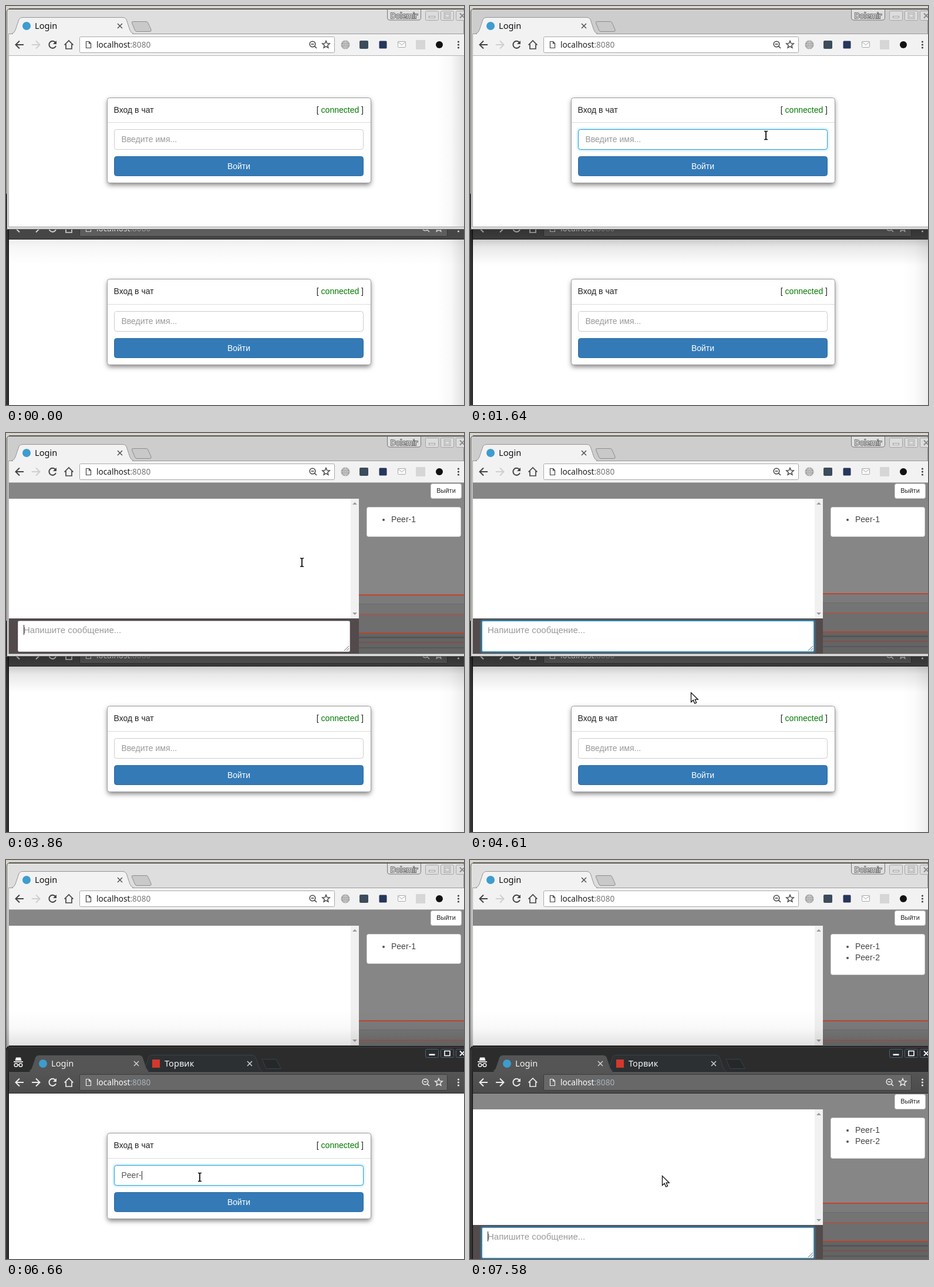
Write an HTML page that moves like this. It is 780 px wide and 680 px high and loops after 8 s.

```html
<!DOCTYPE html>
<html lang="ru">
<head>
<meta charset="utf-8">
<title>Chat login</title>
<style>
html, body { margin: 0; width: 100%; height: 100%; overflow: hidden; background: #d9d3c9; }
svg { display: block; }
text { white-space: pre; }
.ui { font-family: "Noto Sans", sans-serif; }
.pg { font: 14px "Liberation Sans", Arial, sans-serif; fill: #222; }
</style>
</head>
<body>
<svg id="stage" width="780" height="680" viewBox="0 0 780 680" xmlns="http://www.w3.org/2000/svg"></svg>
<script>
const LOOP = 8000;
const NAMES = ['Peer-1', 'Peer-2'];
const OWNER = 'Dolemir', OTHER_TAB = 'Торвик';
const stage = document.getElementById('stage');

const rect = (x, y, w, h, fill, extra = '') =>
  `<rect x="${x}" y="${y}" width="${w}" height="${h}" fill="${fill}" ${extra}/>`;
// one-pixel outline aligned to the pixel grid
const box = (x, y, w, h, fill, line, r = 0, extra = '') =>
  rect(x + .5, y + .5, w - 1, h - 1, fill, `stroke="${line}" rx="${r}" ${extra}`);
const path = (d, fill, line = 'none', w = 1, extra = '') =>
  `<path d="${d}" fill="${fill}" stroke="${line}" stroke-width="${w}" ${extra}/>`;
const text = (x, y, s, cls, extra = '') =>
  `<text x="${x}" y="${y}" class="${cls}" ${extra}>${s}</text>`;
const dot = (x, y, r, fill, extra = '') =>
  `<circle cx="${x}" cy="${y}" r="${r}" fill="${fill}" ${extra}/>`;
const fade = (id, dir, a, mid, b) =>
  `<linearGradient id="${id}" x1="0" y1="0" ${dir}><stop stop-opacity="${a}"/>` +
  `<stop offset=".5" stop-opacity="${mid}"/><stop offset="1" stop-opacity="${b}"/></linearGradient>`;

const DEFS = `<defs>
${fade('down', 'x2="0" y2="1"', .36, .09, 0)}
${fade('up', 'x2="0" y2="1"', 0, .025, .12)}
${fade('side', 'x2="1" y2="0"', 0, .025, .12)}
<linearGradient id="darkBar" x1="0" y1="0" x2="0" y2="1"><stop stop-color="#555"/><stop offset="1" stop-color="#4b4b4b"/></linearGradient>
<filter id="drop" x="-10%" y="-20%" width="120%" height="150%"><feGaussianBlur stdDeviation="4"/></filter>
<filter id="glow" x="-10%" y="-60%" width="120%" height="220%"><feGaussianBlur stdDeviation="1.8"/></filter>
<clipPath id="topClip"><rect y="4" width="780" height="377"/></clipPath>
</defs>`;

function toolbar(dy, dark) {
  const ink = dark ? '#ececec' : '#444', right = dark ? 752 : 560;
  const stroke = (d, c = ink, w = 2) => path(d, 'none', c, w);
  const zoom = right - 38, star = right - 15;
  let pts = '';
  for (let i = 0; i < 10; i++) {
    const a = i * Math.PI / 5, r = i % 2 ? 2.9 : 6.6;
    pts += `${i ? 'L' : 'M'}${star + r * Math.sin(a)} ${66 - r * Math.cos(a)}`;
  }
  return `<g transform="translate(0 ${dy})">` +
    box(125, 52, right - 125, 28, dark ? '#686868' : '#fff', dark ? '#3c3c3c' : '#a9a9a9', 2) +
    stroke('M30 66H17M23 59.5L16.5 66L23 72.5') +
    stroke('M44 66H57M51 59.5L57.5 66L51 72.5', dark ? ink : '#cfcfcf') +
    stroke('M84 62A6 6 0 1 0 85 68') + path('M86 59V65H80Z', ink) +
    stroke('M99.5 66.5L107 59L114.5 66.5M102 65V73H112V65', ink, 1.7) +
    stroke('M136.5 60.5H141.5L144.5 63.5V71.5H136.5ZM141.5 60.5V64H144.5', ink, 1.2) +
    text(154, 71, `localhost<tspan fill="${dark ? '#a9b4bb' : '#777'}">:8080</tspan>`, 'ui',
      `font-size="13.6" fill="${dark ? '#fff' : '#1c1c1c'}"`) +
    dot(zoom, 65, 4.8, 'none', `stroke="${ink}" stroke-width="1.5"`) +
    stroke(`M${zoom + 3.5} 68.5L${zoom + 7} 72M${zoom - 2.5} 65H${zoom + 2.5}`, ink, 1.6) +
    path(pts + 'Z', 'none', ink, 1.4) +
    [61, 66, 71].map(y => dot(770.5, y, 1.6, ink)).join('') + '</g>';
}

function winButtons(y, dark) {
  const line = dark ? '#536070' : '#a6a6a6', ink = dark ? '#fff' : '#f8f8f8';
  const edge = dark ? 'none' : '#888', h = dark ? 15 : 17, c = y + h / 2;
  const square = `M747 ${c - 4}H756V${c + 4}H747Z`;
  return [714, 740, 766].map(x => box(x, y, 23, h, dark ? '#292c30' : '#dcdcdc', line, 2)).join('') +
    rect(720.5, c + 1, 10, 2.5, ink, `stroke="${edge}" stroke-width=".8"`) +
    path(square, 'none', dark ? ink : '#8c8c8c', dark ? 1.6 : 2.4) +
    (dark ? '' : path(square, 'none', ink)) +
    path(`M773 ${c - 4}L781 ${c + 4}M781 ${c - 4}L773 ${c + 4}`, 'none', dark ? ink : '#888', 1.8);
}

const cross = (x, y, c) => path(`M${x - 4} ${y - 4}L${x + 4} ${y + 4}M${x + 4} ${y - 4}L${x - 4} ${y + 4}`, 'none', c, 1.6);
const tab = (x, y, w, fill, line) =>
  path(`M${x} ${y + 28}Q${x + 4} ${y + 27} ${x + 6} ${y + 22}L${x + 12} ${y + 4}Q${x + 14} ${y + .5} ${x + 18} ${y + .5}` +
    `H${x + w - 18}Q${x + w - 14} ${y + .5} ${x + w - 12} ${y + 4}L${x + w - 6} ${y + 22}Q${x + w - 4} ${y + 27} ${x + w} ${y + 28}`, fill, line);
const tabText = (x, y, s, c) => text(x, y, s, 'ui', `font-size="14.6" fill="${c}"`);

// a: shift of the panel head, b: shift of the controls
function loginView(id, a, b) {
  const h = 145 + b - a;
  return `<g id="${id}Login">` +
    rect(173, 160 + a, 448, h, '#000', 'rx="4" opacity=".5" filter="url(#drop)"') +
    box(172, 156 + a, 450, h + 1, '#fff', '#9c9c9c', 4) +
    rect(173, 198 + b, 448, 1, '#ddd') +
    text(183.5, 182 + a, 'Вход в чат', 'pg') +
    text(609, 182 + a, '[ <tspan fill="#007a00">connected</tspan> ]', 'pg', 'text-anchor="end"') +
    rect(184, 210 + b, 425, 35, 'none', `id="${id}Glow" rx="4" stroke="#7fd8f2" stroke-width="3" filter="url(#glow)"`) +
    box(184, 210 + b, 425, 35, '#fff', '#ccc', 4, `id="${id}Input"`) +
    text(196.5, 232 + b, 'Введите имя...', 'pg', `id="${id}Hint" style="fill:#999"`) +
    text(196.5, 232 + b, '', 'pg', `id="${id}Name" style="fill:#555"`) +
    rect(197, 220 + b, 1, 15, '#222', `id="${id}Caret"`) +
    box(184, 256 + b, 425, 34, '#337ab7', '#2e6da4', 4) +
    text(396.5, 278 + b, 'Войти', 'pg', 'text-anchor="middle" style="fill:#fff"') + '</g>';
}

const bands = (y, end) =>
  [[0, '#7b7b7b'], [16, '#747474'], [34, '#6e6e6e'], [66, '#646464']]
    .map(([d, c]) => rect(601, y + d, 179, end - y - d, c)).join('') +
  [[0, '#c4432c', 2], [16, '#6b6b6b', 1], [33, '#a0584c', 2], [65, '#b5442f', 2], [72, '#555', 3], [81, '#7d514b', 2], [90, '#585858', 2]]
    .map(([d, c, h]) => rect(601, y + d, 179, h, c)).join('');

// top: first row of the page, low: upper edge of the message strip
function chatView(id, top, low, end, lineY) {
  const d = top - 85;
  const arrow = (y, s) => path(`M590 ${y + 2 * s}H598L594 ${y - 2 * s}Z`, '#9a9a9a');
  return `<g id="${id}Chat">` + rect(5, top, 775, end - top, '#868686') +
    `<g id="${id}Bands">${bands(lineY, end + 2)}</g>` +
    rect(5, top + 27, 596, low - top - 27, '#fff') + rect(587, top + 27, 14, low - top - 27, '#f1f1f1') +
    arrow(120 + d, 1) + arrow(low - 8, -1) +
    rect(5, low, 596, end - low, '#534a4c') +
    rect(20, low + 4, 566, 53, 'none', `id="${id}AreaGlow" rx="2" stroke="#3ba9df" stroke-width="3" filter="url(#glow)"`) +
    box(20, low + 4, 566, 53, '#fff', '#ccc', 2, `id="${id}Area"`) +
    text(30, low + 25, 'Напишите сообщение...', 'pg', 'style="font-size:15px;fill:#999"') +
    rect(30, low + 11, 1, 17, '#222', `id="${id}AreaCaret"`) +
    path(`M576 ${low + 55}L584 ${low + 47}M580 ${low + 55}L584 ${low + 51}`, 'none', '#666') +
    box(723, 86 + d, 53, 26, '#fff', '#ccc', 3) +
    text(749.5, 102 + d, 'Выйти', 'pg', 'text-anchor="middle" style="font-size:11px"') +
    box(614, 126 + d, 161, 51, '#fff', '#d4d4d4', 3, `id="${id}List"`) +
    NAMES.map((n, i) => `<g id="${id}User${i}">` + dot(643, 148 + d + 19 * i, 2, '#555') +
      text(656, 152 + d + 19 * i, n, 'pg', 'style="fill:#444"') + '</g>').join('') + '</g>';
}

function topWindow() {
  return `<g id="topWin">` + rect(0, 380, 780, 62, 'url(#down)', 'id="topShade"') +
    '<g clip-path="url(#topClip)">' +
    path('M1.5 381V10Q1.5 5 7 5H780V381Z', '#ddd', '#555', 1, 'id="topFrame"') +
    rect(5, 4, 775, 2, '#555') +
    path('M649.5 6V20Q649.5 24 654 24H702Q706.5 24 706.5 20V6', '#dedede', '#777') +
    text(678, 20.5, OWNER, 'ui', 'font-size="12.3" text-anchor="middle" fill="#f4f4f4" stroke="#666" stroke-width="2" paint-order="stroke"') +
    winButtons(8, false) +
    rect(4, 47, 776, 1, '#9a9a9a') + rect(4, 48, 776, 36, '#f2f2f2') +
    tab(10, 19, 207, '#f2f2f2', '#959595') + rect(12, 47, 203, 2, '#f2f2f2') +
    path('M216 26.5H239Q241 26.5 242 29L247 40Q248 43.5 245 43.5H223Q220.5 43.5 219.5 41L214.5 29Q214 26.5 216 26.5Z', '#c9c9c9', '#8e8e8e') +
    dot(35, 34, 7, '#3d9cd0') + tabText(49, 39, 'Login', '#111') + cross(194, 34, '#555') +
    toolbar(0, false) +
    dot(578, 66, 7.5, '#a5a5a5') +
    path('M571 66H585M578 59V73M573 61.5Q578 64 583 61.5M573 70.5Q578 68 583 70.5M578 59Q571.5 66 578 73M578 59Q584.5 66 578 73', 'none', '#d5d5d5', .8) +
    rect(602, 59, 15, 14, '#3c4c5c', 'rx="2"') + rect(635.5, 59.5, 13, 13, '#26365c', 'rx="1.5"') +
    box(667, 60, 14, 11, '#fafafa', '#aaa', 1) + path('M667.5 61L674 66.5L680.5 61', 'none', '#aaa') +
    rect(698, 58, 16, 16, '#d6d6d6') + dot(738, 66, 6, '#111') +
    rect(4, 84, 776, 1, '#b4b4b4') + rect(5, 85, 775, 291, '#fff') +
    loginView('top', 0, 0) + chatView('top', 85, 316, 376, 275) +
    rect(2, 376, 778, 5, '#dedede') + rect(4, 376, 776, 1, '#9f9f9f') + rect(4, 48, 1, 329, '#a5a5a5') +
    rect(0, 380, 780, 1, '#666') + rect(735, 85, 45, 291, 'url(#side)', 'id="topSide"') + '</g></g>';
}

function lowWindow() {
  const hat = '#f0f0f0';
  return `<g id="lowWin">` + rect(0, 256, 780, 62, 'url(#up)', 'id="lowShade"') +
    path('M0 681V322Q1 317.5 7 317.5H780V681Z', '#2c2c2c', '#111') +
    rect(5, 318.5, 775, 1, '#444') + winButtons(322, true) +
    path('M17 336.5H25L26.5 342H15.5Z', hat) + rect(13, 343, 16, 1.8, hat) +
    dot(17, 349.5, 2.8, 'none', `stroke="${hat}" stroke-width="1.5"`) +
    dot(25, 349.5, 2.8, 'none', `stroke="${hat}" stroke-width="1.5"`) + path('M19.5 349H22.5', 'none', hat, 1.4) +
    tab(231, 332, 206, '#2d3033', '#33454d') +
    path('M436 339.5H460L468.5 355.5H443Z', '#25282a', '#34444b') +
    rect(5, 360, 775, 1, '#1f2527') + rect(5, 361, 775, 36, 'url(#darkBar)') +
    tab(38, 332, 207, '#555', '#27353a') + rect(41, 359.5, 201, 2, '#555') +
    dot(63, 347, 7, '#3d9cd0') + tabText(77, 352, 'Login', '#f4f4f4') + cross(222, 347, '#ccc') +
    rect(249, 340, 13, 14, '#d4382c') + tabText(270, 352, OTHER_TAB, '#f4f4f4') + cross(415, 347, '#ccc') +
    toolbar(313, true) +
    rect(5, 397, 775, 1, '#2a2a2a') + rect(5, 398, 775, 282, '#fff') +
    loginView('low', 309, 310) + chatView('low', 398, 622, 680, 584) +
    rect(4, 361, 1, 319, '#161616') + rect(1, 324, 1, 356, '#484848') +
    rect(735, 398, 45, 282, 'url(#side)', 'id="lowSide"') + '</g>';
}

const CURSORS =
  `<g id="beam">${['#fff', '#000'].map((c, i) =>
    path('M-3 -6.5H-1Q0 -6.5 0 -5.5Q0 -6.5 1 -6.5H3M0 -5.5V6.5M-3 7.5H-1Q0 7.5 0 6.5Q0 7.5 1 7.5H3', 'none', c, i ? 1.7 : 4)).join('')}</g>` +
  path('M-2.5 -1.5V14.5L1.2 11.2L3.7 17L6.6 15.7L4.2 10.2H9.3Z', '#fff', '#111', 1.3, 'id="arrow"');

stage.innerHTML = DEFS + rect(0, 0, 780, 680, '#d9d3c9') + '<g id="wins">' + lowWindow() + topWindow() +
  `</g><g id="pointer">${CURSORS}</g>`;

const el = {};
stage.querySelectorAll('[id]').forEach(n => el[n.id] = n);
const set = (id, k, v) => el[id].setAttribute(k, v);
const show = (id, on) => set(id, 'display', on ? 'inline' : 'none');
const ramp = (t, a, b) => Math.min(1, Math.max(0, (t - a) / (b - a)));
const smooth = p => p * p * (3 - 2 * p);
const mix = (a, b, p) => a + (b - a) * p;
const rgb = (a, b, p) => `rgb(${a.map((v, i) => Math.round(mix(v, b[i], p)))})`;
const GREY = [204, 204, 204], BLUE = [48, 158, 212];

const KEYS = {
  top: [2300, 2480, 2760, 2810, 3090, 3480],
  low: [5750, 5990, 6280, 6390, 6660, 7000]
};
const ENTER = { top: 3860, low: 7380 };

function drawView(id, name, t, focus, caret, areaFocus, areaCaret) {
  const n = KEYS[id].filter(k => t >= k).length, chat = t >= ENTER[id];
  show(id + 'Login', !chat);
  show(id + 'Chat', chat);
  set(id + 'Input', 'stroke', rgb(GREY, BLUE, focus));
  set(id + 'Glow', 'opacity', focus * focus * .6);
  show(id + 'Hint', !n);
  el[id + 'Name'].textContent = name.slice(0, n);
  show(id + 'Caret', caret);
  if (!chat) set(id + 'Caret', 'x', Math.round(196.5 + (n ? el[id + 'Name'].getComputedTextLength() : 0)));
  set(id + 'Area', 'stroke', rgb(GREY, BLUE, areaFocus));
  set(id + 'AreaGlow', 'opacity', areaFocus * .6);
  show(id + 'AreaCaret', areaCaret);
  const both = t >= ENTER.low;
  set(id + 'List', 'height', both ? 69 : 50);
  show(id + 'User1', both);
}

function drawPointer(t) {
  const a = ramp(t, 450, 720), b = smooth(ramp(t, 4330, 4770)), c = ramp(t, 5040, 5190);
  const ease = 1 - (1 - a) ** 2;
  const x = mix(mix(mix(790, 504, ease), 326, b), 330, c);
  const y = mix(mix(mix(272, 220, ease), 539, b), 540, c);
  const beam = t < 3900 ? x < 609 : y > 520 && t < 7460;
  show('pointer', t >= 480);
  show('beam', beam);
  show('arrow', !beam);
  set('pointer', 'transform', `translate(${Math.round(x)} ${Math.round(y)})`);
}

function draw(t) {
  const lowUp = t >= 5040, topUp = t >= 860 && !lowUp;
  const front = el[lowUp ? 'lowWin' : 'topWin'];
  if (el.wins.lastChild !== front) el.wins.appendChild(front);
  set('topFrame', 'fill', topUp ? '#cdcdcd' : '#dedede');
  set('topShade', 'opacity', topUp ? 1 : .35);
  show('topShade', !lowUp);
  show('lowShade', lowUp);
  show('topSide', t < 860);
  show('lowSide', !lowUp);
  set('lowSide', 'opacity', topUp ? .6 : 1);

  drawView('top', NAMES[0], t, smooth(ramp(t, 880, 1070)),
    t >= 900 && t < 1640 || t >= 2250,
    lowUp ? 0 : smooth(ramp(t, 3860, 4000)), t < 4460);
  drawView('low', NAMES[1], t, lowUp ? smooth(ramp(t, 4980, 5190)) : 0,
    lowUp && t < 5560 || t >= 5750, smooth(ramp(t, 7400, 7560)), true);
  set('topBands', 'transform', `translate(0 ${t < 3900 ? 0 : -2})`);
  drawPointer(t);
}

const start = performance.now();
function tick() {
  draw((performance.now() - start) % LOOP);
  requestAnimationFrame(tick);
}
tick();
</script>
</body>
</html>
```
